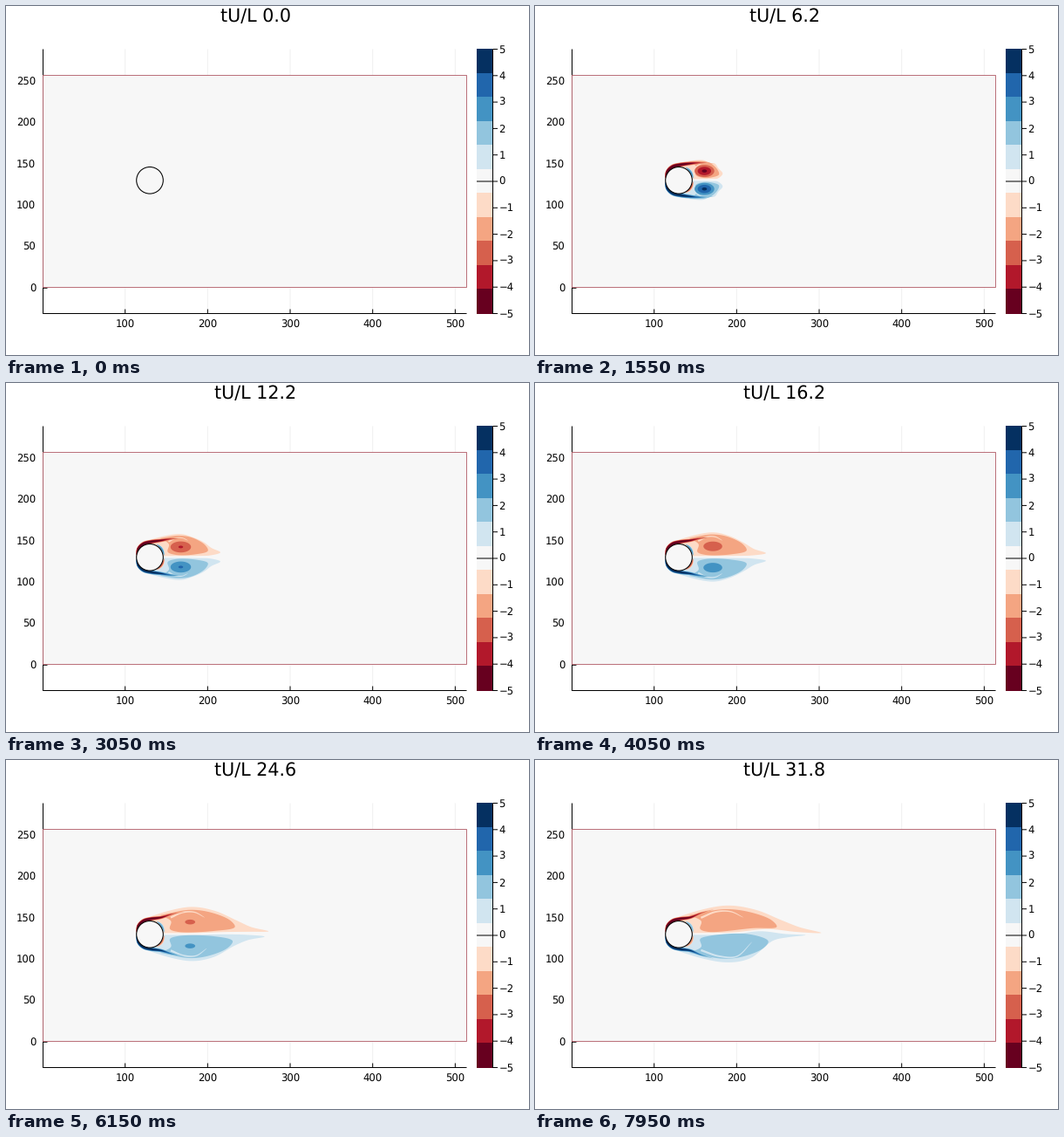
A matplotlib script that plays this animation: 600 by 400 pixels, repeating every 8000 ms.

```python
import numpy as np
import matplotlib.pyplot as plt
from matplotlib.animation import FuncAnimation
from matplotlib.patches import Circle, Polygon, Rectangle

W, H, DPI = 600, 400, 100
FRAMES, STEP = 160, 50
PX = 72 / DPI
MID_Y = 199.4           # symmetry line of the wake
CX, CY, R = 165, 199.8, 15.3

REDS = ["#fddbc7", "#f4a582", "#d6604d", "#b2182b", "#67001f"]
BLUES = ["#d1e5f0", "#92c5de", "#4393c3", "#2166ac", "#053061"]
GREY = "#f7f7f7"
CORE_LEVELS = (2.27, 3.18, 4.09)

plt.rcParams.update({"font.family": "DejaVu Sans", "text.hinting": "none"})
fig = plt.figure(figsize=(W / DPI, H / DPI), dpi=DPI, facecolor="white")
ax = fig.add_axes([0, 0, 1, 1])
ax.set(xlim=(0, W), ylim=(H, 0))
ax.axis("off")


def line(x0, y0, x1, y1, color="black", z=1):
    ax.plot([x0, x1], [y0, y1], color=color, lw=PX, zorder=z, snap=False, solid_capstyle="butt")


def box(x, y, w, h, z=1, **style):
    ax.add_patch(Rectangle((x, y), w, h, zorder=z, snap=False, **style))


def label(x, y, text, ha, size=11.6, va="center_baseline"):
    return ax.text(x, y, text, ha=ha, va=va, fontsize=size * PX, zorder=9)


def draw_axes():
    for v in range(100, 501, 100):
        x = 42 + v * 0.9467
        line(x, 49.5, x, 352.5, "#f0f0f0", 0)
        line(x, 352.5, x, 347.5)
        label(x, 363.8, str(v), "center")
    for v in range(0, 251, 50):
        y = 323.3 - v * 0.946
        line(42.5, y, 47.5, y)
        label(34.3, y - 0.4, str(v), "right")
    line(42.5, 49.5, 42.5, 353)
    line(42, 352.5, 528.5, 352.5)
    box(42.5, 79.5, 486, 243, 2, fc=GREY, ec="#b5626d", lw=0.9 * PX)


def draw_colorbar():
    bands = BLUES[::-1] + [GREY] + REDS
    h = 303 / len(bands)
    for i, c in enumerate(bands):
        box(540, 49.5 + i * h, 18, h, fc=c, lw=0, antialiased=False)
    line(558.5, 49.5, 558.5, 353, z=3)
    for v in range(-5, 6):
        y = 201 - v * 30.3
        line(558.5 if v else 540, y, 564, y, z=3)
        label(565.5, y - 0.4, str(v).replace("-", "\u2212"), "left")


def curve(points, n=90, end=1.0):
    """Smooth path through points, cut off at a share of its length."""
    p = np.array(points, float)
    s = np.r_[0, np.cumsum(np.sqrt(np.hypot(*np.diff(p, axis=0).T)) + 1e-3)]
    m = np.gradient(p, s, axis=0)
    q = np.linspace(0, s[-1] * end, n)
    i = np.clip(np.searchsorted(s, q, side="right") - 1, 0, len(s) - 2)
    d = (s[i + 1] - s[i])[:, None]
    u = (q - s[i])[:, None] / d
    return ((1 + 2 * u) * (1 - u) ** 2 * p[i] + u * (1 - u) ** 2 * d * m[i]
            + u * u * (3 - 2 * u) * p[i + 1] - u * u * (1 - u) * d * m[i + 1])


def ribbon(path, half):
    d = np.gradient(path, axis=0)
    normal = np.c_[-d[:, 1], d[:, 0]] / (np.hypot(*d.T)[:, None] + 1e-6)
    off = normal * half[:, None]
    return np.r_[path + off, (path - off)[::-1]]


def oval(cx, cy, rx, ry):
    a = np.linspace(0, 2 * np.pi, 48)
    return np.c_[cx + rx * np.cos(a), cy + ry * np.sin(a)]


def decay(t, tau):
    return np.exp(-t / tau)


class Wake:
    """One half of the flow, above (sign 1) or below (sign -1) the symmetry line.

    Shapes use x and the height above that line.
    """

    def __init__(self, sign, own, other):
        self.sign = sign
        colors = [own[0], own[1], own[0], *own[2:], *own[1:], *other[:3]]
        self.parts = [Polygon([(0, 0)] * 3, fc=c, lw=0, zorder=3) for c in colors]
        for p in self.parts:
            ax.add_patch(p)

    def measure(self, t):
        """Sizes shared by all shapes at time t."""
        a = np.clip((t - 21) / 11, 0, 1)
        self.sway = a * a * (3 - 2 * a)
        self.lag = self.sway if self.sign < 0 else 0
        self.grow = 1 - decay(t, 1.5)
        self.tip = 181 + 5.75 * t - 0.035 * t * t - 18 * self.lag
        self.top_x = 170 + 18 * (1 - decay(t, 2)) + 0.9 * t
        self.top = 17.5 + 18 * (1 - decay(t, 18))
        self.inner_top = self.top - 0.6 - 0.11 * t
        self.left = 180 + self.grow * (3 + 0.2 * t)

    def floor(self, x, h):
        """Lower edge, lifted where the centreline begins to sway."""
        return x, h + 4.5 * self.sign * self.sway * np.exp(-((x - 262) / 26) ** 2)

    def outer(self, t):
        span = self.tip - self.top_x
        blunt, slim = decay(t, 8), 1 - 0.5 * self.lag
        edge = [(0, 1), (0.32, 0.86), (0.6, (0.46 + 0.8 * blunt) * slim),
                (0.78, (0.22 + 0.8 * blunt) * slim), (1, 0.09 + 0.5 * blunt - 0.06 * self.sway)]
        crest = [(self.top_x + u * span, self.top * min(h, 0.95 if u else 1)) for u, h in edge]
        base = [self.floor(self.tip - u * span, h) for u, h in ((0.25, 1.8), (0.55, 1.3), (0.9, 1.1))]
        return curve([(149, 0), (151, 11.7), (161, 18), *crest, *base, (180, 1)])

    def inner(self, t):
        span = (self.tip - self.top_x) * (0.5 + 0.5 * decay(t, 13))
        edge = [(0, 1), (0.46, 0.9), (0.9, 0.56), (1, 0.29)]
        crest = [(self.top_x + u * span, self.inner_top * h) for u, h in edge]
        base = [self.floor(self.top_x + 0.55 * span, 3), (self.left + 9 * self.grow, 2.5),
                (self.left, 6), (self.left + 1.5, 14.5)]
        start = (167 + 10 * self.grow, 16.5 + 5 * self.grow)
        return curve([start, *crest, *base, start])

    def gap(self, t):
        x0, x1 = self.left + 1, 190 + 1.55 * t + 10 * self.lag
        h = self.inner_top
        path = [(x0, h - 5 - 0.15 * t), (x0 + (x1 - x0) * 0.35, h - 2.9),
                (x0 + (x1 - x0) * 0.7, h - 2.7), (x1, 18.8 - 10 * self.lag)]
        width = 1.2 * (1 - decay(t, 7)) * self.grow
        return ribbon(curve(path, 40), width * np.sqrt(np.linspace(1, 0, 40)))

    def core(self, t):
        """Level sets of a decaying, spreading vortex."""
        peak = 2 + 4.2 * decay(t, 10)
        size = (10 + 0.8 * t) * (1 - decay(t, 2))
        x = 190.3 + 0.85 * t - 9.5 * decay(t, 3)
        h = 9.3 + 0.18 * t - 3 * decay(t, 2)
        for level in CORE_LEVELS:
            r = size * np.sqrt(max(0, np.log(peak / level)))
            yield oval(x, h, r, r * (0.45 + 0.3 * decay(t, 10)))

    def shear(self, t):
        g = self.grow
        path = [(150, 2), (152, 9.3), (158, 15), (166, 17.3), (174 + 4 * g, 14 + 5 * g),
                (179 + 11 * g, 9 + (10 + 0.15 * t) * g), (181 + 24 * g, 5 + (12 + 0.35 * t) * g)]
        s = np.linspace(0, 1, 60)
        thick = np.sqrt(np.minimum(1, 4 * s)) * (1 - s ** 3)
        thick *= (0.6 + 0.4 * min(1, t / 3)) * (1 + 0.35 * decay(t, 8))
        for k in range(4):
            yield ribbon(curve(path, 60, 1 - 0.095 * k), (2.4 - 0.3 * k) * thick)

    def film(self, t):
        """Counter-rotating layer on the back of the cylinder."""
        a = np.radians(np.linspace(6, 62, 30))
        back = np.c_[CX + 16.4 * np.cos(a), 16.4 * np.sin(a)]
        half = np.sin(np.linspace(0, np.pi, 30)) * np.clip((t - 1) / 3, 0, 1)
        for k in (1.9, 1.3, 0.7 * np.clip((34 - t) / 20, 0, 1)):
            yield ribbon(back, k * half)

    def update(self, t):
        self.measure(t)
        shapes = [self.outer(t), self.inner(t), self.gap(t),
                  *self.core(t), *self.shear(t), *self.film(t)]
        for part, xy in zip(self.parts, shapes):
            part.set_visible(t > 0)
            part.set_xy(np.c_[xy[:, 0], MID_Y - self.sign * xy[:, 1]])


draw_axes()
draw_colorbar()
title = label(286, 17.8, "", "center", 20.6, "baseline")
wakes = [Wake(1, REDS, BLUES), Wake(-1, BLUES, REDS)]
ax.add_patch(Circle((CX, CY), R, fc=GREY, ec="black", lw=1.05 * PX, zorder=5))


def update(i):
    t = i * 0.2
    title.set_text(f"tU/L {t:.1f}")
    for wake in wakes:
        wake.update(t)
    return []


anim = FuncAnimation(fig, update, frames=FRAMES, interval=STEP, repeat=True, repeat_delay=0)
plt.show()
```
